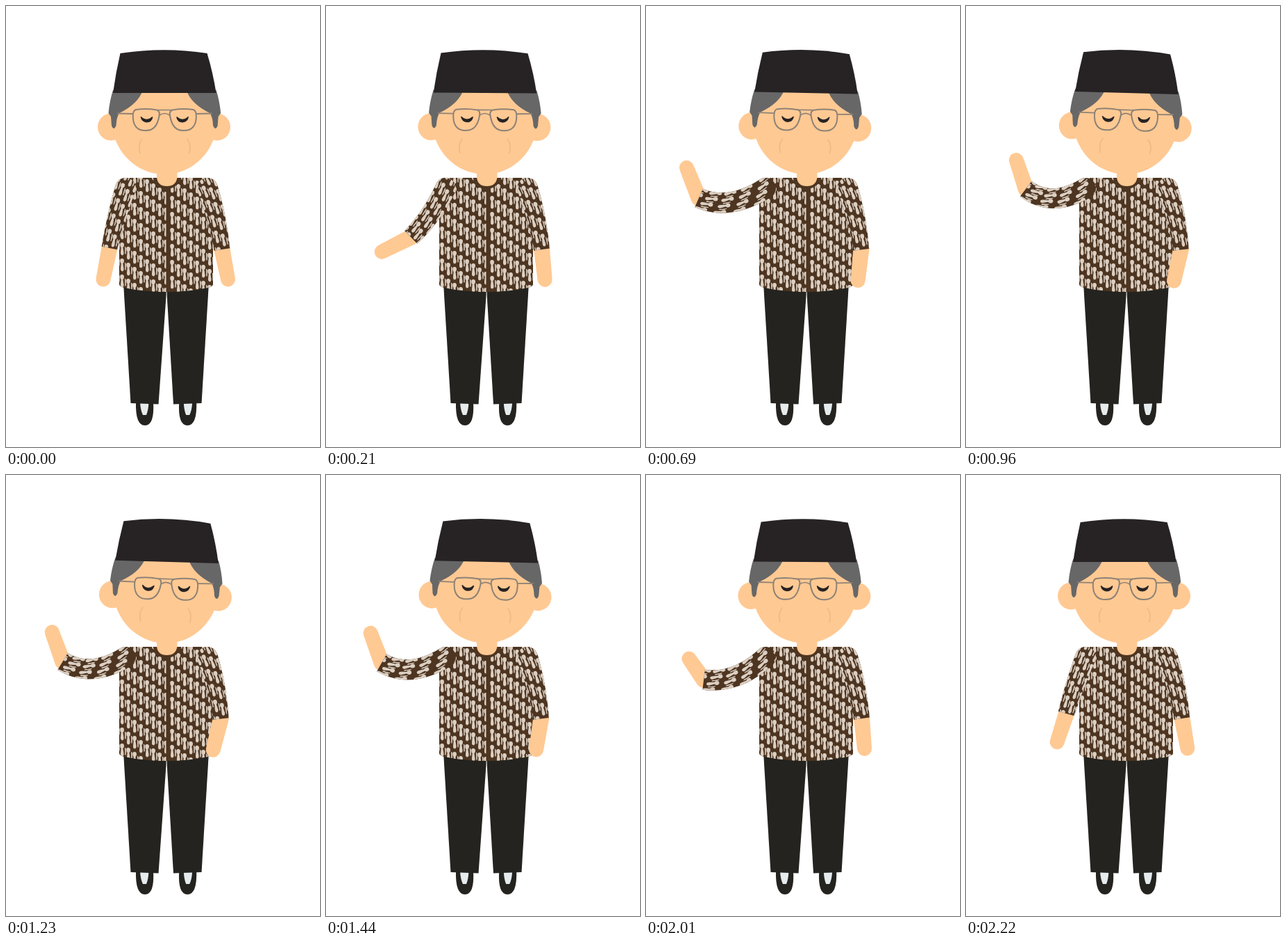
These frames come from a looping animation (452 by 634 pixels, 2.25 s). An HTML page with a canvas:

```html
<!DOCTYPE html>
<html lang="en">
<head>
<meta charset="utf-8">
<title>Waving man</title>
<style>
html, body { margin: 0; width: 100%; height: 100%; overflow: hidden; background: #fff; }
canvas { display: block; }
</style>
</head>
<body>
<canvas id="stage" width="452" height="634"></canvas>
<script>
const ctx = document.getElementById('stage').getContext('2d');
const LOOP = 2250, STEP = 30;
const SKIN = '#ffc993', BROWN = '#4d3521', CREAM = '#dbcfc2', HAT = '#272324',
      CLOTH = '#24231f', HAIR = '#676767', METAL = '#8d8276', CREASE = '#efb986';

const lerp = (a, b, k) => a + (b - a) * k;
const mix = (a, b, k) => a.map((v, i) => lerp(v, b[i], k));

// Angles run clockwise from straight down.
const polar = ([x, y], deg, dist) => {
  const a = deg * Math.PI / 180;
  return [x - dist * Math.sin(a), y + dist * Math.cos(a)];
};

// [at, sleeve angle, length, forearm angle, length, bend x, bend y, cuff half-width]
const RAISE = [
  [0, 15, 89, 11.3, 46, 158, 304, 11.5],
  [0.1, 18.8, 85.5, 18, 43, 156, 302, 12],
  [0.59, 55.8, 87, 120, 52, 147, 306, 14.5],
  [0.8, 70, 94.6, 145, 37, 131, 300, 14.5],
  [1, 81.7, 97, 158, 47, 120, 295, 14.5]
];
const INWARD = [1, 92.8, 81, 163, 42, 125, 289, 13.5];
const OUTWARD = RAISE[RAISE.length - 1];

function raisePose(p) {
  const i = Math.max(1, RAISE.findIndex(key => p <= key[0]));
  const a = RAISE[i - 1], b = RAISE[i];
  return mix(a, b, (p - a[0]) / (b[0] - a[0]));
}

function wavePose(t) {
  if (t < 690) return raisePose(Math.min(1, t / 660));
  if (t > 1950) return raisePose((LOOP - t) / 300);
  const swing = 1 - Math.abs(((t - 750 + 600) % 600) / 300 - 1);
  return mix(OUTWARD, INWARD, t < 750 ? 0 : swing);
}

function fillPath(d, color) {
  ctx.fillStyle = color;
  ctx.fill(new Path2D(d));
}

function strokePath(d, color, width) {
  ctx.strokeStyle = color;
  ctx.lineWidth = width;
  ctx.stroke(new Path2D(d));
}

function ellipse(x, y, rx, ry, color) {
  ctx.fillStyle = color;
  ctx.beginPath();
  ctx.ellipse(x, y, rx, ry, 0, 0, Math.PI * 2);
  ctx.fill();
}

function mirrored(axis, draw) {
  draw();
  ctx.save();
  ctx.translate(axis * 2, 0);
  ctx.scale(-1, 1);
  draw();
  ctx.restore();
}

const MOTIF = new Path2D(
  'M-2.8 3Q-2.8 0 0 0Q3 0 3 3.5Q3 6 1.3 7L2.6 15Q2.4 18.5 0 18.5' +
  'Q-2.4 18 -2 14L-1.3 7Q-2.8 6 -2.8 3ZM4 6L5.2 6L5.4 16L4.4 17ZM-4 1L-3.2 2L-3.4 11L-4.4 9Z');

function motif(x, y, angle) {
  ctx.save();
  ctx.translate(x, y);
  ctx.rotate(angle);
  ctx.fill(MOTIF);
  ctx.restore();
}

// Columns of motifs, each stepped down from the one to its left.
function batik(left, right, top, bottom, place) {
  ctx.fillStyle = CREAM;
  for (let i = 0, x = left; x < right; i++, x += 9) {
    for (let y = top - 23 + i * 6 % 23; y < bottom; y += 23) place(x, y);
  }
}

function forearm(from, to) {
  const a = Math.atan2(to[1] - from[1], to[0] - from[0]), q = Math.PI / 2;
  ctx.fillStyle = SKIN;
  ctx.beginPath();
  ctx.arc(...from, 11.5, a + q, a - q);
  ctx.arc(...to, 10.5, a - q, a + q);
  ctx.fill();
}

function sleeve(start, bend, end, cuff) {
  const at = k => {
    const a = mix(start, bend, k), b = mix(bend, end, k);
    const [x, y] = mix(a, b, k);
    return { x, y, angle: Math.atan2(b[1] - a[1], b[0] - a[0]) };
  };
  const offset = (k, d) => {
    const { x, y, angle } = at(k);
    return [x + d * Math.sin(angle), y - d * Math.cos(angle)];
  };
  const shape = new Path2D();
  for (let i = 0; i <= 16; i++) shape.lineTo(...offset(i / 16, lerp(15, cuff, i / 16)));
  for (let i = 16; i >= 0; i--) shape.lineTo(...offset(i / 16, -lerp(15, cuff, i / 16)));
  shape.closePath();
  const cap = at(0).angle;
  const shoulder = new Path2D();
  shoulder.arc(...start, 15, cap + Math.PI / 2, cap - Math.PI / 2);
  shape.addPath(shoulder);

  ctx.save();
  ctx.clip(shape);
  ctx.fillStyle = BROWN;
  ctx.fillRect(0, 0, 452, 634);
  batik(-14, 18, -12, 92, (across, along) => {
    const k = along / 90;
    motif(...offset(k, across), at(k).angle - Math.PI / 2);
  });
  ctx.restore();
}

function legs() {
  mirrored(230.6, () => {
    fillPath('M187 569L212 569Q214 603 200 603Q186 603 187 569Z', CLOTH);
    fillPath('M193 569L205.5 569Q205 581 202 588L197 588Q193.5 581 193 569Z', '#e6ebed');
  });
  fillPath('M169 398L231 398L230.5 418L219.5 572.5L179.5 571Z', CLOTH);
  fillPath('M231 398L292 398L281.5 571L241 572.5L231.8 418Z', CLOTH);
}

function torso() {
  const shirt = new Path2D(
    'M170 247L291 247Q298 249 298 256L298 400Q298 403 291 405' +
    'Q262 411 231 411Q199 411 170 405Q163 403 163 400L163 256Q163 249 170 247Z');
  ctx.save();
  ctx.clip(shirt);
  ctx.fillStyle = BROWN;
  ctx.fillRect(160, 240, 142, 175);
  batik(167, 302, 248, 414, (x, y) => motif(x, y, 0));
  ellipse(231.5, 244, 20, 19, BROWN);
  ctx.fillStyle = BROWN;
  ctx.fillRect(230.5, 256, 5.5, 160);
  ctx.restore();
}

function head(tilt) {
  ctx.save();
  ctx.translate(232, 240);
  ctx.rotate(tilt);
  ctx.translate(-232, -240);

  ellipse(151, 174, 19, 19.5, SKIN);
  ellipse(304, 174, 19, 19.5, SKIN);
  ellipse(228, 163, 76, 79, SKIN);
  mirrored(228.3, () => {
    fillPath('M154 121L197 121Q190 141 163 154Q159 160 158.5 172Q155 180 152 172' +
             'L151 159L147.5 154Q149 137 154 121Z', HAIR);
    strokePath('M160 154.5L183 155', METAL, 1.8);
    strokePath('M187 149Q202 147 217 149.5Q222 151 220.5 158Q217 179 202 179' +
               'Q187 180 183.5 166Q181 151 187 149Z', METAL, 2);
    fillPath('M193.5 159Q195 158.5 197 161Q202.5 164.5 208 161Q210 158.5 211.5 159.5' +
             'Q210 167.5 202.5 167.5Q195 167 193.5 159Z', HAT);
    strokePath('M196 191Q189 199 193 212', CREASE, 1.6);
  });
  strokePath('M217 149.5L239.5 149.5M221 157Q228 152 235.5 157', METAL, 1.6);
  fillPath('M164.5 68Q228 58.5 289.5 68Q298 96 302.5 125L154 125Q158 96 164.5 68Z', HAT);
  ctx.restore();
}

function arms(t, sway) {
  const [, angle, length, turn, reach, bendX, bendY, cuff] = wavePose(t);
  const shoulder = [172, 262];
  const elbow = polar(shoulder, angle, length);
  forearm(elbow, polar(elbow, turn, reach));
  sleeve(shoulder, [bendX, bendY], elbow, cuff);

  const restElbow = mix([311, 350], [309, 350.5], sway);
  forearm(restElbow, mix([319.5, 393], [296, 395.5], sway));
  sleeve([290, 262], [304, 302], restElbow, 11.5);
}

function draw(t) {
  const sway = 1 - Math.abs(t / (LOOP / 2) - 1);
  ctx.fillStyle = '#fff';
  ctx.fillRect(0, 0, 452, 634);
  legs();
  torso();
  arms(t, sway);
  fillPath('M217 230L246.5 230L246.5 246Q245 259 231.5 259Q218 259 217 246Z', SKIN);
  head(sway * 1.8 * Math.PI / 180);
}

const origin = performance.now();
function frame() {
  const t = (performance.now() - origin) % LOOP;
  draw(Math.floor(t / STEP) * STEP);
  requestAnimationFrame(frame);
}
frame();
</script>
</body>
</html>
```
